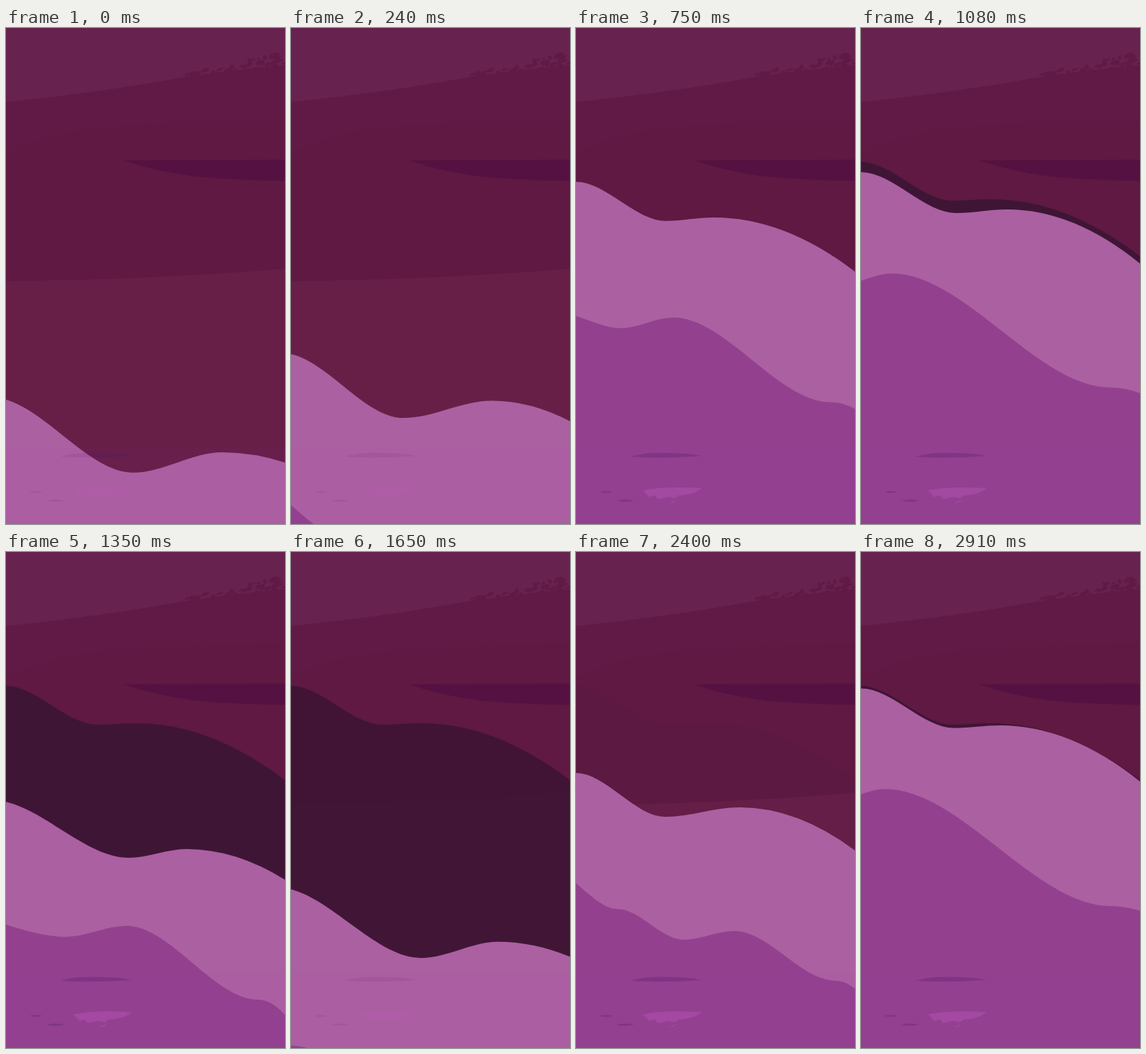
Animation, 382 px wide and 678 px high, one loop 2.94 s. Source, as an HTML page with a canvas:

```html
<!DOCTYPE html>
<html lang="en">
<head>
<meta charset="utf-8">
<title>Waves on the shore</title>
<style>
html, body { margin: 0; width: 100%; height: 100%; overflow: hidden; background: #601a42; }
canvas { display: block; }
</style>
</head>
<body>
<canvas id="stage" width="382" height="678"></canvas>
<script>
const W = 382, H = 678, LOOP = 2940, CYCLE = 1890, LOW = 40, PEAK = 905, STEP = 30;
const ctx = document.getElementById('stage').getContext('2d');

// Poses of a wave edge: crest, dip, hump and right end as x,y pairs.
const foamPoses = [
  { at: LOW,  pts: [-20,506, 174,609, 296,581, W,595] },
  { at: 510,  pts: [0,302, 122,362, 224,349, W,408] },
  { at: PEAK, pts: [0,183, 125,236, 178,234, W,312] },
  { at: 1080, pts: [0,197, 130,253, 200,248, W,322] },
  { at: 1350, pts: [-20,339, 168,418, 247,406, W,448] }
];
// Crest, ledge, dip, hump, shelf and right end.
const risen = [-40,432, 57,488, 147,530, 217,518, 355,586, 420,650];
const deepPoses = [
  { at: LOW,  pts: risen.map((v, i) => i % 2 ? v + 290 : v) },
  { at: 510,  pts: risen },
  { at: 1020, pts: [-220,295, -140,335, -40,341, 33,324, 342,484, 420,509] },
  { at: 1350, pts: [-180,430, -90,490, 82,526, 165,511, 345,612, 420,698] }
];
const wetLine = foamPoses.find(p => p.at === PEAK).pts;

// Repeats the poses with the cycle, in both directions.
function poseAt(poses, i) {
  const n = poses.length, turn = Math.floor(i / n), { at, pts } = poses[i - turn * n];
  return { at: at + turn * CYCLE, pts };
}

// Smooth interpolation in time that rests at turning points.
function shapeAt(poses, t) {
  let i = poses.length - 1;
  while (poseAt(poses, i).at > t) i--;
  const [a, b, c, d] = [-1, 0, 1, 2].map(o => poseAt(poses, i + o));
  const h = c.at - b.at, u = (t - b.at) / h;
  const tangent = (p, q, r, j) => {
    const h0 = q.at - p.at, h1 = r.at - q.at;
    const s0 = (q.pts[j] - p.pts[j]) / h0, s1 = (r.pts[j] - q.pts[j]) / h1;
    return s0 * s1 <= 0 ? 0 : (s0 * h1 + s1 * h0) / (h0 + h1);
  };
  const ease = u * u * (3 - 2 * u);
  return b.pts.map((v, j) => v + (c.pts[j] - v) * ease
    + h * u * (1 - u) * ((1 - u) * tangent(a, b, c, j) - u * tangent(b, c, d, j)));
}

// S-curves join the points; the last stretch falls away as a parabola.
function wavePath(pts) {
  const path = new Path2D();
  let [x, y] = pts;
  path.moveTo(x, y);
  for (let i = 2; i < pts.length; i += 2) {
    const nx = pts[i], ny = pts[i + 1], third = (nx - x) / 3;
    if (i < pts.length - 2) path.bezierCurveTo(x + third, y, nx - third, ny, nx, ny);
    else path.quadraticCurveTo((x + nx) / 2, y, nx, ny);
    x = nx;
    y = ny;
  }
  path.lineTo(x, 1100);
  path.lineTo(pts[0], 1100);
  return path;
}

function fillPath(d, color) {
  ctx.fillStyle = color;
  ctx.fill(new Path2D(d));
}

function drawSand() {
  ctx.fillStyle = '#68224f';
  ctx.fillRect(0, 0, W, H);
  fillPath('M0 101Q130 88 245 67Q310 57 382 51V678H0Z', '#611a45');
  let seed = 7;
  const rnd = () => (seed = seed * 16807 % 2147483647) / 2147483647;
  for (let i = 0; i < 38; i++) {
    const f = rnd(), x = 248 + f * 134;
    ctx.beginPath();
    ctx.ellipse(x, 66 - f * 14 - rnd() * (3 + f * 17), 2 + rnd() * 5, 1 + rnd() * 2.5, -0.4, 0, 7);
    ctx.fill();
  }
  fillPath('M0 172Q60 138 180 132T382 125V678H0Z', '#5f1942');
  fillPath('M162 181L382 180V209Q310 208 260 203Q205 196 162 181Z', '#551141');
  fillPath('M0 346Q200 344 382 329V678H0Z', '#671f48');
  drawMarks(1);
}

// Faint marks that show through water and sand alike.
function drawMarks(strength) {
  ctx.globalAlpha = strength;
  ctx.fillStyle = 'rgba(130,40,160,.05)';
  ctx.fillRect(0, 574, W, H - 574);
  const shade = 'rgba(75,25,105,.27)';
  fillPath('M74 586Q95 580 125 581Q155 581 172 585Q120 589 74 586Z', shade);
  fillPath('M32 634Q41 632 50 634Q41 637 32 634Z', shade);
  fillPath('M55 646Q67 643 80 646Q67 649 55 646Z', shade);
  fillPath('M92 632Q120 626 172 629Q162 638 140 639L136 643L126 641L112 644L108 639L100 641Z'
    + 'M127 650L139 644L133 649Z', 'rgba(195,90,200,.32)');
  ctx.globalAlpha = 1;
}

function drawWater(pts, color, markStrength) {
  const path = wavePath(pts);
  ctx.save();
  ctx.fillStyle = color;
  ctx.fill(path);
  ctx.clip(path);
  drawMarks(markStrength);
  ctx.restore();
}

// Sand darkens under the wave, then dries; the next peak wets it again.
function wetness(t) {
  if (t < PEAK) return 0;
  if (t >= PEAK + CYCLE) return 1;
  return Math.min(1, Math.max(0, (2450 - t) / 850));
}

function draw(now) {
  const t = Math.floor(now % LOOP / STEP) * STEP, phase = t % CYCLE;
  drawSand();
  ctx.globalAlpha = wetness(t);
  ctx.fillStyle = '#3f1536';
  ctx.fill(wavePath(wetLine));
  ctx.globalAlpha = 1;
  drawWater(shapeAt(foamPoses, phase), '#ab60a1', 0.35);
  drawWater(shapeAt(deepPoses, phase), '#93418f', 1);
}

let start;
function tick(now) {
  start ??= now;
  draw(now - start);
  requestAnimationFrame(tick);
}
requestAnimationFrame(tick);
</script>
</body>
</html>
```
